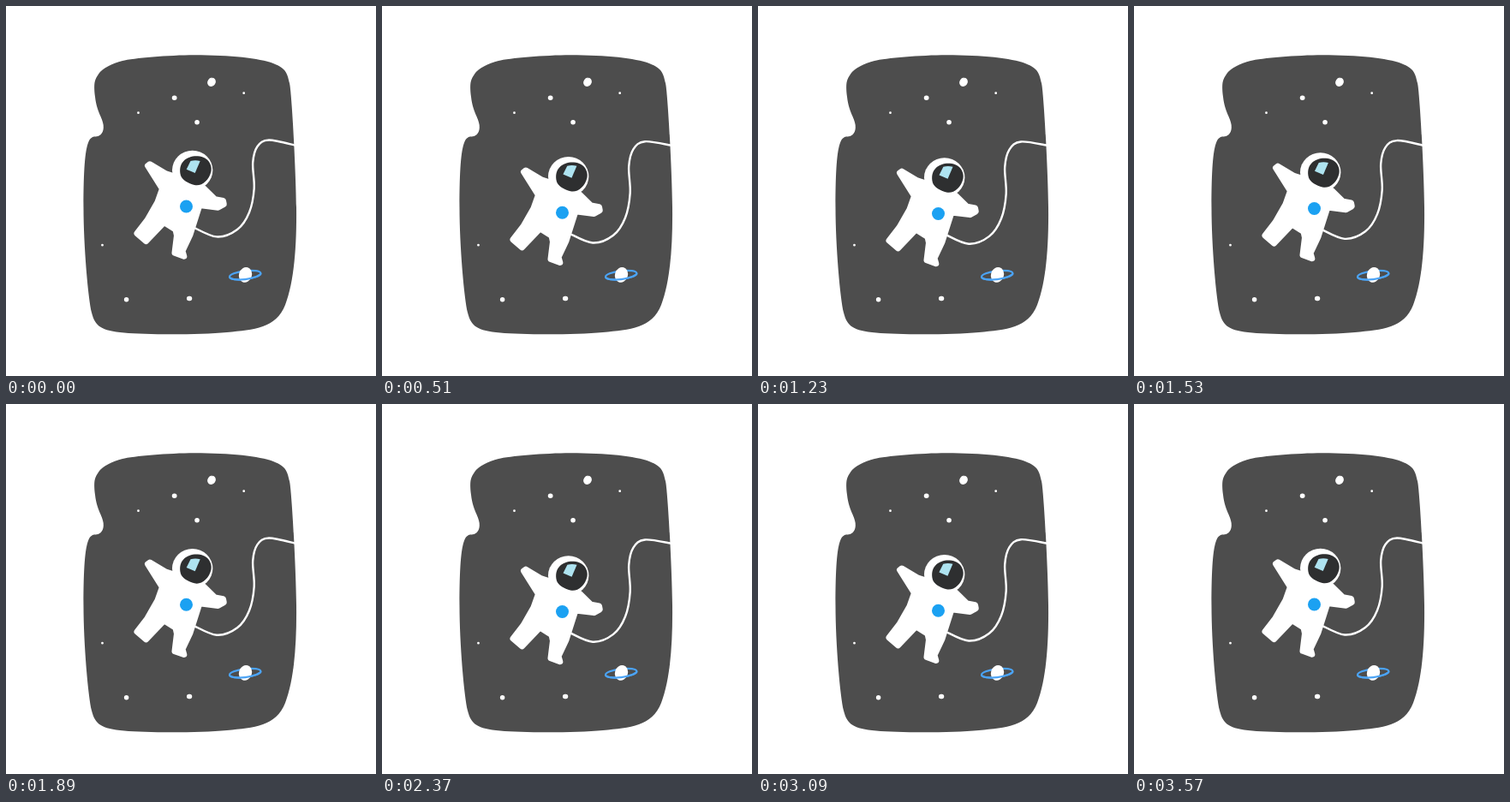
These frames come from a looping animation (432 px wide and 432 px high, 3.6 s). An HTML page:

```html
<!DOCTYPE html>
<html lang="en">
<head>
<meta charset="utf-8">
<title>Floating astronaut</title>
<style>
  html, body { margin: 0; width: 100%; height: 100%; overflow: hidden; background: #fff; }
  svg { display: block; width: 100%; height: 100%; }
  .line { fill: none; stroke: #fff; stroke-linecap: round; }
  .ring { fill: none; stroke: #4ba3f5; stroke-width: 2.2; }
</style>
</head>
<body>
<svg viewBox="0 0 432 432">
  <path id="sky" fill="#4d4d4d" d="M220 57.3C262 57.3 296 61 312 67S328.5 80 331 90S338.5 190 339 235S336.5 322 326 349S290 378 258 381S165 384 138 381.500S104 374 100 358S90.500 280 90.500 235S92.500 170 95.500 161S102 152.800 106 152.300S114.700 148 113.700 139S106 124 104 106S104 86 108 79.500S124 67 136 64S190 57.300 220 57.300Z"/>

  <g id="stars" class="line">
    <ellipse cx="240" cy="88.800" rx="4.100" ry="4.800" transform="rotate(35 240 88.800)" fill="#fff"/>
    <path stroke-width="5.500" d="M196.500 107.200h.3M223 135.800h.1M140.600 342.800h0M213.700 341.500h.8"/>
    <path stroke-width="2.800" d="M277.700 101.700h0M154.500 124.700h0M112.500 279.200h0"/>
  </g>

  <g id="planet">
    <ellipse class="ring" cx="279.200" cy="314.200" rx="18.300" ry="4.900" transform="rotate(-7 279.200 314.200)"/>
    <ellipse cx="279.500" cy="313.900" rx="7.500" ry="9" fill="#fff" transform="rotate(18 279.500 313.900)"/>
    <path class="ring" d="M261 316.400A18.300 4.900 -7 0 0 297.400 312"/>
  </g>

  <path id="tether" class="line" stroke-width="2.400"/>

  <g id="astronaut">
    <path fill="#fff" stroke="#fff" stroke-width="7" stroke-linejoin="round" d="M165.500 186.500L168 184.700L186 195.500L200 200L231 213L244 225.700L253.500 227.500L254.300 231.500L247.500 235.200L226 232.500L215 267L206 286L207.800 292.200L197 288.300L199.500 268L198 261L184.500 252.500L163.500 274.500L153 265.500L165 250L177 229L182.500 213.500Z"/>
    <ellipse cx="217.700" cy="191.700" rx="23.700" ry="23"  fill="#fff"/>
    <path fill="#2e2f30" d="M204 198C200 182 212 174.500 224 175.300C237 176 241 187 239.500 193C237 204 228 211 220 209C213 207 205.500 203 204 198Z"/>
    <path id="glare" fill="#aee3f0" d="M215.500 181Q221 179.500 226.700 181L220.700 195L210.700 190.700Z"/>
    <circle cx="210.500" cy="234" r="7.500" fill="#1ba1f2"/>
  </g>
</svg>
<script>
  const PERIOD = 1800, DRIFT = 12;
  const [astronaut, glare, tether] =
    ['astronaut', 'glare', 'tether'].map(id => document.getElementById(id));

  const rope = [
    [218, 258], [246, 269.4], [270, 261], [284, 241], [289.7, 213],
    [288.2, 183], [293.5, 164], [307, 156.5], [339, 163]
  ];

  // Catmull-Rom spline through the points, as an SVG path
  function spline(points) {
    const at = i => points[Math.max(0, Math.min(points.length - 1, i))];
    const handle = (i, dir) =>
      at(i).map((v, k) => v + dir * (at(i + 1)[k] - at(i - 1)[k]) / 6);
    return points.slice(1).reduce(
      (d, p, i) => `${d}C${handle(i, 1)} ${handle(i + 1, -1)} ${p}`, `M${points[0]}`);
  }

  function draw(now) {
    const sink = DRIFT * (1 - Math.cos(2 * Math.PI * now / PERIOD)) / 2;
    const last = rope.length - 1;
    // the rope follows the astronaut less and less towards its fixed end
    const hanging = rope.map(([x, y], i) => [x, y + sink * (1 - (i / last) ** 2)]);
    tether.setAttribute('d', spline(hanging));
    astronaut.setAttribute('transform', `translate(0 ${sink})`);
    glare.setAttribute('transform', `translate(${sink / 10} ${-sink / 5})`);
  }

  let begin;
  function tick(now) {
    begin ??= now;
    draw(now - begin);
    requestAnimationFrame(tick);
  }
  draw(0);
  requestAnimationFrame(tick);
</script>
</body>
</html>
```
